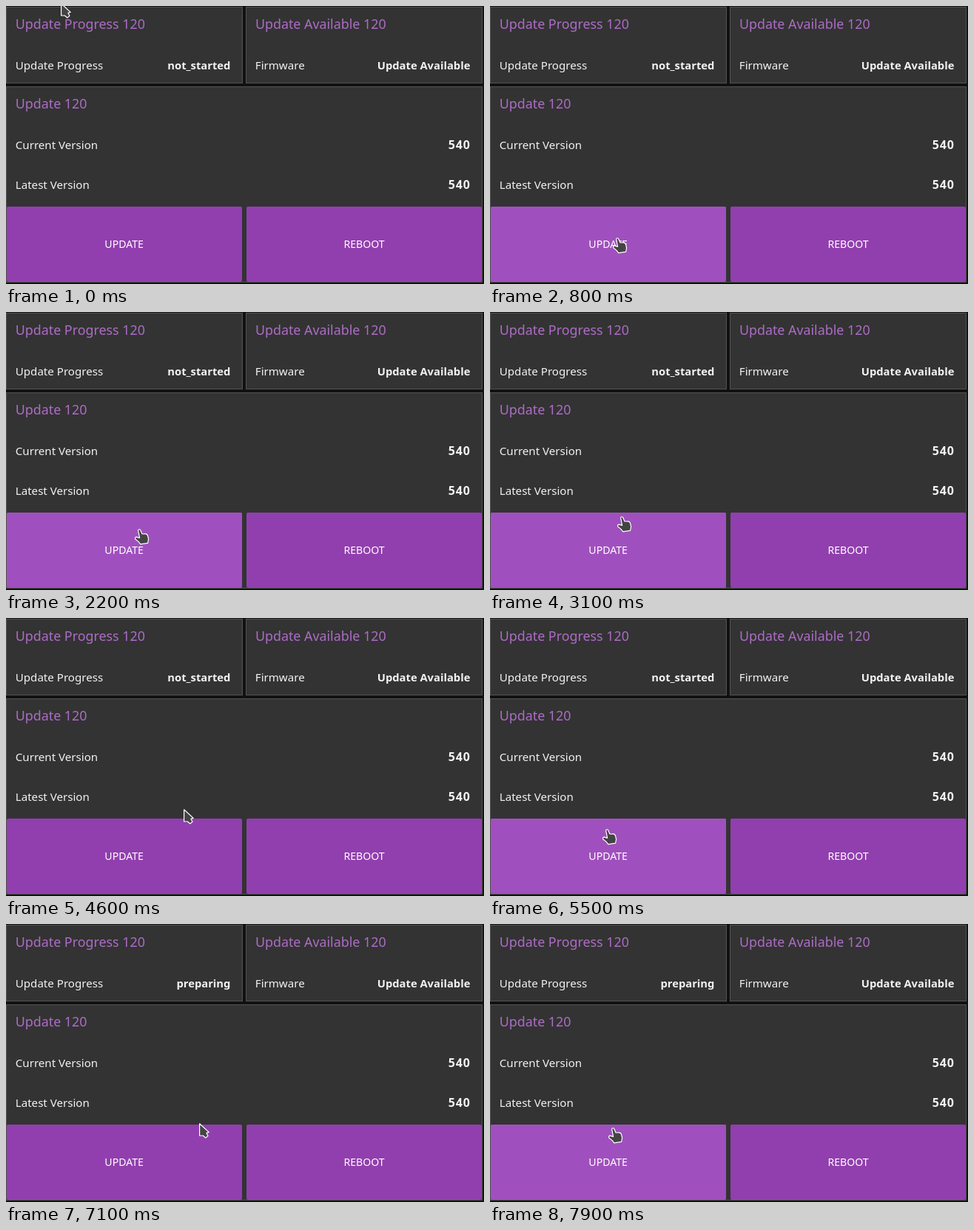
Animation of 646 by 377 pixels, one loop 8000 ms. Source, as an HTML page:

```html
<!DOCTYPE html>
<html lang="en">
<head>
<meta charset="utf-8">
<title>Firmware update panel</title>
<style>
  html, body { margin: 0; width: 100%; height: 100%; overflow: hidden; background: #111; }
  svg { display: block; width: 646px; height: 377px; font-family: "Noto Sans", "Open Sans", sans-serif; }
  .panel { fill: #333; stroke: #535353; }
  .title { font-size: 17.85px; fill: #ad6cc6; }
  .label { font-size: 15.1px; fill: #f2f2f2; }
  .value { font-size: 14.75px; font-weight: 700; fill: #f2f2f2; text-anchor: end; }
  .number { font-size: 16px; letter-spacing: .8px; }
  .button { fill: #913fae; }
  .caption { font-size: 14.1px; fill: #fff; text-anchor: middle; }
  .cursor { fill: #444; stroke: #fff; stroke-width: 1.2; stroke-linejoin: round; }
</style>
</head>
<body>
<svg viewBox="0 0 646 377">
  <clipPath id="face"><rect x="1" y="272" width="318" height="102" rx="2"/></clipPath>

  <rect class="panel" x=".5" y="1.5" width="319" height="103"/>
  <text class="title" x="12.7" y="31">Update Progress 120</text>
  <text class="label" x="12.8" y="86">Update Progress</text>
  <text class="value" x="303.4" y="86" id="status">not_started</text>

  <rect class="panel" x="324.5" y="1.5" width="319" height="103"/>
  <text class="title" x="336.9" y="31">Update Available 120</text>
  <text class="label" x="336.8" y="86">Firmware</text>
  <text class="value" x="627.4" y="86">Update Available</text>

  <rect class="panel" x=".5" y="109.5" width="643" height="265"/>
  <text class="title" x="12.7" y="139">Update 120</text>
  <text class="label" x="12.8" y="194">Current Version</text>
  <text class="value number" x="627.6" y="194">540</text>
  <text class="label" x="12.8" y="248">Latest Version</text>
  <text class="value number" x="627.6" y="248">540</text>

  <rect class="button" x="1" y="272" width="318" height="102" rx="2"/>
  <g clip-path="url(#face)">
    <rect id="hover" x="1" y="272" width="318" height="102" fill="#a050be"/>
    <circle id="ripple" fill="none" stroke="#fff" stroke-opacity=".12"/>
  </g>
  <text class="caption" x="159.6" y="328">UPDATE</text>
  <rect class="button" x="325" y="272" width="318" height="102" rx="2"/>
  <text class="caption" x="484" y="328">REBOOT</text>

  <path id="arrow" class="cursor" d="M.6.8V17H5.4L8.8 20 12 17.4 10 13.4 13.2 12.4Z"/>
  <path id="hand" class="cursor" d="M4.6 2Q5.8-.2 7.6 1.4L10 7 14.6 6.8Q17 7 17.6 9.6L18.6 14 17.6 19.4 7.8 20.8 5 17.4.8 14Q0 11.4 2.2 11.2L6.6 12.4Z"/>
</svg>
<script>
const LOOP = 8000, STEP = 100, FADE = 200;
const BUTTON_TOP = 272, RIPPLE = 140, STATUS_AT = 5800;
const CLICKS = [1000, 4800];

// Rest points of the pointer; it circles on its way to each one
const stops = [
  { t: 0, x: 74, y: -4 },
  { t: 650, x: 166, y: 314 },
  { t: 1000, x: 166, y: 314 },
  { t: 1400, x: 171, y: 315, turns: 1, reach: 35 },
  { t: 3100, x: 172, y: 277, turns: 2, reach: 35 },
  { t: 4600, x: 240, y: 259, turns: 1, reach: 16 },
  { t: 4800, x: 179, y: 305 },
  { t: 6500, x: 271, y: 270, turns: 1, reach: -35 },
  { t: 7900, x: 160, y: 276, turns: -1, reach: 20 }
];

const $ = id => document.getElementById(id);
const clamp = v => Math.max(0, Math.min(1, v));
const mix = (a, b, u) => a + (b - a) * u;

function pointerAt(t) {
  const i = stops.findIndex(s => s.t >= t);
  if (i === 0) return stops[0];
  const to = stops.at(i), from = stops.at(i - 1);
  if (i < 0) return to;
  const { turns = 0, reach = 0 } = to;
  const u = (t - from.t) / (to.t - from.t);
  const angle = 2 * Math.PI * turns * u;
  return {
    x: mix(from.x, to.x, u) + reach * (1 - Math.cos(angle)),
    y: mix(from.y, to.y, u) + reach / 4 * Math.sin(angle)
  };
}

const isOver = t => pointerAt(Math.max(0, t)).y >= BUTTON_TOP;

// Share of the last moments spent over the button
function hoverAt(t) {
  const samples = 4;
  let over = 0;
  for (let k = 1; k <= samples; k++) over += isOver(t - k * FADE / samples);
  return over / samples;
}

function drawRipple(t) {
  const click = CLICKS.findLast(c => c <= t) ?? -LOOP;
  const age = t - click;
  const { x, y } = pointerAt(click);
  const outer = RIPPLE * (1 - (1 - clamp(age / 400)) ** 2);
  const inner = RIPPLE * clamp((age - 115) / 400);
  const ring = $("ripple");
  ring.setAttribute("cx", x + 6);
  ring.setAttribute("cy", y);
  ring.setAttribute("r", (outer + inner) / 2);
  ring.setAttribute("stroke-width", Math.max(0, outer - inner));
}

function draw(t) {
  const { x, y } = pointerAt(t);
  const over = isOver(t);
  $("hover").setAttribute("opacity", hoverAt(t));
  $("arrow").style.display = over ? "none" : "";
  $("hand").style.display = over ? "" : "none";
  $(over ? "hand" : "arrow").setAttribute("transform", `translate(${Math.round(x)} ${Math.round(y)})`);
  $("status").textContent = t < STATUS_AT ? "not_started" : "preparing";
  drawRipple(t);
}

const start = performance.now();
function tick() {
  const t = (performance.now() - start) % LOOP;
  draw(Math.floor(t / STEP) * STEP);
  requestAnimationFrame(tick);
}
tick();
</script>
</body>
</html>
```
